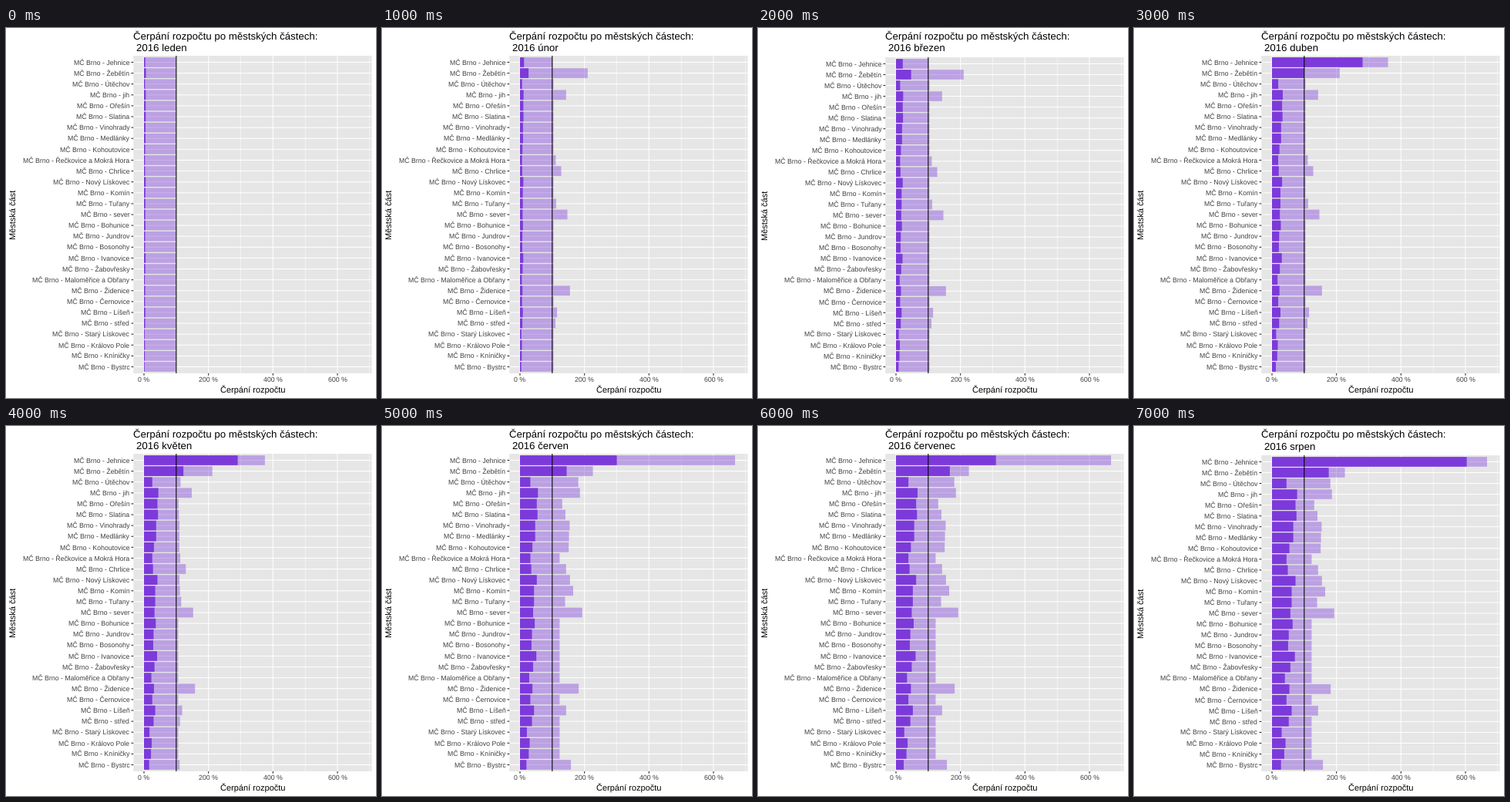
A matplotlib script that plays this animation: 480x480 px, repeating every 8 s.

```python
import numpy as np
import matplotlib.pyplot as plt
from matplotlib.animation import FuncAnimation

SIZE, DPI = 480, 72
LEFT, RIGHT, BOTTOM = 165.3, 474.5, 448.0   # panel edges in pixels
X0, SCALE = 179.0, 0.4183                   # zero position, pixels per percent
PANEL, PURPLE = "#e6e6e6", "#7c3ada"
LABEL, TICK = "#404040", "#282828"

MONTHS = ["leden", "únor", "březen", "duben", "květen", "červen", "červenec", "srpen"]
LAST = len(MONTHS) - 1
LOW_PANEL = {"březen", "srpen"}             # the panel starts 2 px lower here

# Percent of the budget spent by the last month
DISTRICTS = {
    "Jehnice": 604, "Žebětín": 176, "Útěchov": 45, "jih": 78, "Ořešín": 73,
    "Slatina": 76, "Vinohrady": 66, "Medlánky": 66, "Kohoutovice": 54,
    "Řečkovice a Mokrá Hora": 45, "Chrlice": 49, "Nový Lískovec": 73,
    "Komín": 61, "Tuřany": 61, "sever": 57, "Bohunice": 64, "Jundrov": 52,
    "Bosonohy": 50, "Ivanovice": 71, "Žabovřesky": 57,
    "Maloměřice a Obřany": 40, "Židenice": 54, "Černovice": 45, "Líšeň": 61,
    "střed": 52, "Starý Lískovec": 30, "Královo Pole": 42, "Kníničky": 38,
    "Bystrc": 28,
}

# Adjusted budgets that stand out in spring and in summer, in percent
SPRING = {"Žebětín": 210, "jih": 143, "sever": 147, "Židenice": 155, "Chrlice": 128,
          "Řečkovice a Mokrá Hora": 111, "Líšeň": 115, "Tuřany": 112, "střed": 110}
SUMMER = {"Žebětín": 226, "sever": 193, "jih": 186, "Židenice": 182, "Útěchov": 181,
          "Komín": 165, "Bystrc": 158, "Nový Lískovec": 155, "Vinohrady": 154,
          "Medlánky": 152, "Kohoutovice": 151, "Chrlice": 143, "Líšeň": 143,
          "Slatina": 141, "Tuřany": 140, "Ořešín": 131}

# Districts with jumps: key months and values
SPENT_KEYS = {"Jehnice": ([0, 2, 3, 6, 7], [4, 21, 281, 310, 604]),
              "Žebětín": ([0, 2, 3, 6, 7], [6, 47, 100, 167, 176])}
PLAN_KEYS = {"Jehnice": ([0, 2, 3, 4, 5], [100, 102, 360, 375, 667])}


def spent(name, i):
    """Steady spending through the year, unless key points say otherwise."""
    if name in SPENT_KEYS:
        return np.interp(i, *SPENT_KEYS[name])
    return DISTRICTS[name] * max(0.07, i / LAST)


def plan(name, i):
    """The budget is raised in February, a little in May and again in June."""
    if name in PLAN_KEYS:
        return np.interp(i, *PLAN_KEYS[name])
    spring, summer = SPRING.get(name, 104), SUMMER.get(name, 123)
    may = spring + 0.12 * (summer - spring)
    return np.interp(i, [0, 1, 3, 4, 5], [100, spring, spring, may, summer])


plt.rcParams.update({"font.family": "Liberation Sans", "text.hinting": "none"})
fig = plt.figure(figsize=(SIZE / DPI, SIZE / DPI), dpi=DPI, facecolor="white")
ax = fig.add_axes([0, 0, 1, 1])


def to_x(percent):
    return X0 + SCALE * percent


def text(x, y, s, size, color="black", **kw):
    ax.text(x, y, s, size=size, color=color, **{"va": "baseline", **kw})


def vline(percent, y0, y1, color, lw=1.07, zorder=1):
    ax.vlines(to_x(percent), y0, y1, color=color, lw=lw, zorder=zorder, snap=False)


def hline(rows, x0, x1, color):
    ax.hlines(rows, x0, x1, color=color, lw=1.07, zorder=1, snap=False)


def draw(i):
    ax.clear()
    ax.set(xlim=(0, SIZE), ylim=(SIZE, 0))
    ax.axis("off")

    month = MONTHS[i]
    top = 38.0 if month in LOW_PANEL else 36.0
    step = (BOTTOM - top) / (len(DISTRICTS) + 0.2)
    rows = top + step * (0.6 + np.arange(len(DISTRICTS)))

    # Panel and grid
    ax.add_patch(plt.Rectangle((LEFT, top), RIGHT - LEFT, BOTTOM - top,
                               fc=PANEL, lw=0, zorder=0, snap=False))
    vline(np.arange(100, 701, 200), top, BOTTOM, "white", lw=0.53)
    vline(np.arange(0, 601, 200), top, BOTTOM, "white")
    hline(rows, LEFT, RIGHT, "white")

    # Bars and the 100 % mark
    for value, alpha in ((plan, 0.4), (spent, 1)):
        widths = [SCALE * value(name, i) for name in DISTRICTS]
        ax.barh(rows, widths, height=0.9 * step, left=X0, color=PURPLE,
                alpha=alpha, lw=0, zorder=2, snap=False)
    vline(100, top, BOTTOM, "black", zorder=3)

    # Axes
    hline(rows, LEFT - 2.75, LEFT, TICK)
    for y, name in zip(rows, DISTRICTS):
        text(160.3, y + 3.1, f"MČ Brno - {name}", 8.8, LABEL, ha="right")
    for p in range(0, 601, 200):
        vline(p, BOTTOM, BOTTOM + 2.75, TICK)
        text(to_x(p), 459.3, f"{p} %", 8.8, LABEL, ha="center")

    # Titles
    text((LEFT + RIGHT) / 2, 473, "Čerpání rozpočtu", 11, ha="center")
    text(15.5, (top + BOTTOM) / 2, "Městská část", 11, ha="right", va="center", rotation=90)
    text(LEFT, 15.5, "Čerpání rozpočtu po městských částech:", 13.2)
    text(LEFT + 3.67, 30, f"2016 {month}", 13.2)
    return []


anim = FuncAnimation(fig, draw, frames=len(MONTHS), interval=1000,
                     init_func=lambda: [], repeat=True, repeat_delay=0, blit=False)
plt.show()
```
